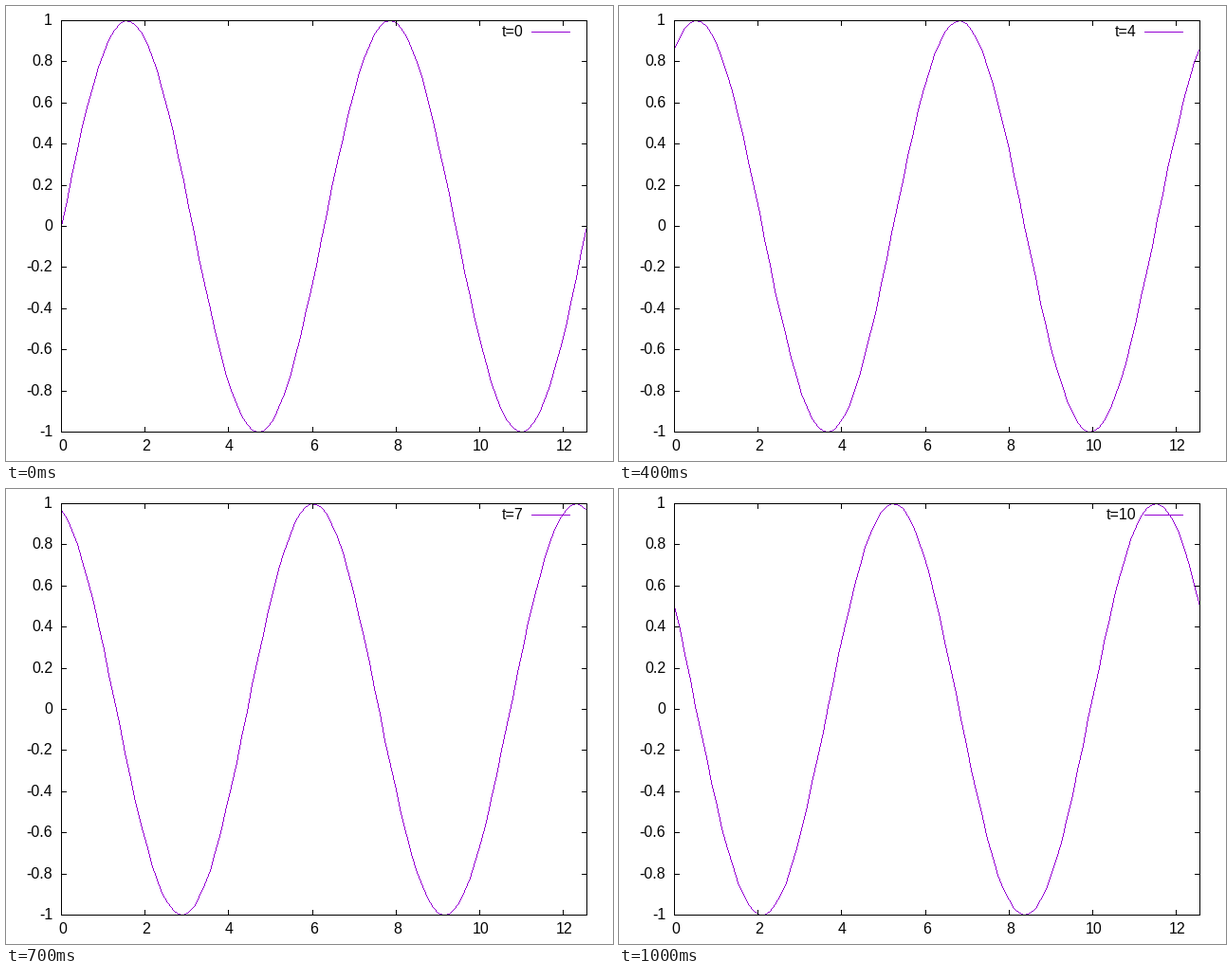
Animation, 640 px wide and 480 px high, one loop 1.1 s. Source, as a matplotlib script:

```python
import numpy as np
import matplotlib.pyplot as plt
from matplotlib.animation import FuncAnimation

W, H = 640, 480
LEFT, RIGHT, TOP, BOTTOM = 58, 612, 15, 449
X_MAX = 4 * np.pi
SAMPLES = 100
STEPS = 11
TICK = 5
FONT_PX = 16
BLACK, PURPLE = (0, 0, 0), (148, 0, 211)
# glyph advances in em; every digit is 0.556
ADVANCE = {".": 0.278, "-": 0.333, "t": 0.278, "=": 0.584}

plt.rcParams["font.family"] = "Liberation Sans"
plt.rcParams["text.hinting"] = "default"


def px(x):
    return np.floor(LEFT + x / X_MAX * (RIGHT - LEFT) + 0.5).astype(int)


def py(y):
    return BOTTOM - np.floor((y + 1) / 2 * (BOTTOM - TOP) + 0.5).astype(int)


def text_width(s):
    return FONT_PX * sum(ADVANCE.get(c, 0.556) for c in s)


def text_start(s, x, align):
    """Left pen position, on a whole pixel edge, for text aligned at edge x."""
    return round(x - align * text_width(s)) - 0.5


def label(s, x, y, align):
    return ax.text(text_start(s, x, align), y + 4.5, s, color="black",
                   fontsize=FONT_PX * 72 / fig.dpi, ha="left", va="baseline")


def draw_polyline(img, xs, ys, color):
    for x0, y0, x1, y1 in zip(xs[:-1], ys[:-1], xs[1:], ys[1:]):
        n = max(abs(x1 - x0), abs(y1 - y0)) + 1
        cols = np.floor(np.linspace(x0, x1, n) + 0.5).astype(int)
        rows = np.floor(np.linspace(y0, y1, n) + 0.5).astype(int)
        img[rows, cols] = color


def draw_frame(img):
    img[[TOP, BOTTOM], LEFT:RIGHT + 1] = BLACK
    img[TOP:BOTTOM + 1, [LEFT, RIGHT]] = BLACK
    for c in px(x_ticks):
        img[TOP:TOP + TICK + 1, c] = BLACK
        img[BOTTOM - TICK:BOTTOM + 1, c] = BLACK
    for r in py(y_ticks):
        img[r, LEFT:LEFT + TICK + 1] = BLACK
        img[r, RIGHT - TICK:RIGHT + 1] = BLACK


def render(t):
    img = np.full((H, W, 3), 255, np.uint8)
    draw_polyline(img, px(x), py(np.sin(x + t * np.pi / 12)), PURPLE)
    img[27, 554:595] = PURPLE
    draw_frame(img)
    return img


x = np.linspace(0, X_MAX, SAMPLES)
x_ticks = np.arange(0, 13, 2)
y_ticks = np.arange(-5, 6) / 5

fig = plt.figure(figsize=(W / 100, H / 100), dpi=100, facecolor="white")
ax = fig.add_axes([0, 0, 1, 1])
ax.axis("off")
canvas = ax.imshow(render(0), interpolation="nearest", aspect="auto")
ax.set_xlim(-0.5, W - 0.5)
ax.set_ylim(H - 0.5, -0.5)

for v in x_ticks:
    label(f"{v}", px(v) + 1.5, 464, 0.5)
for v in y_ticks:
    label(f"{v:g}", 49, py(v), 1)
key = label("t=0", 545.5, 27, 1)


def update(t):
    canvas.set_data(render(t))
    s = f"t={t}"
    key.set_text(s)
    key.set_x(text_start(s, 545.5, 1))
    return canvas, key


anim = FuncAnimation(fig, update, frames=STEPS, interval=100,
                     repeat=True, repeat_delay=0)
plt.show()
```
